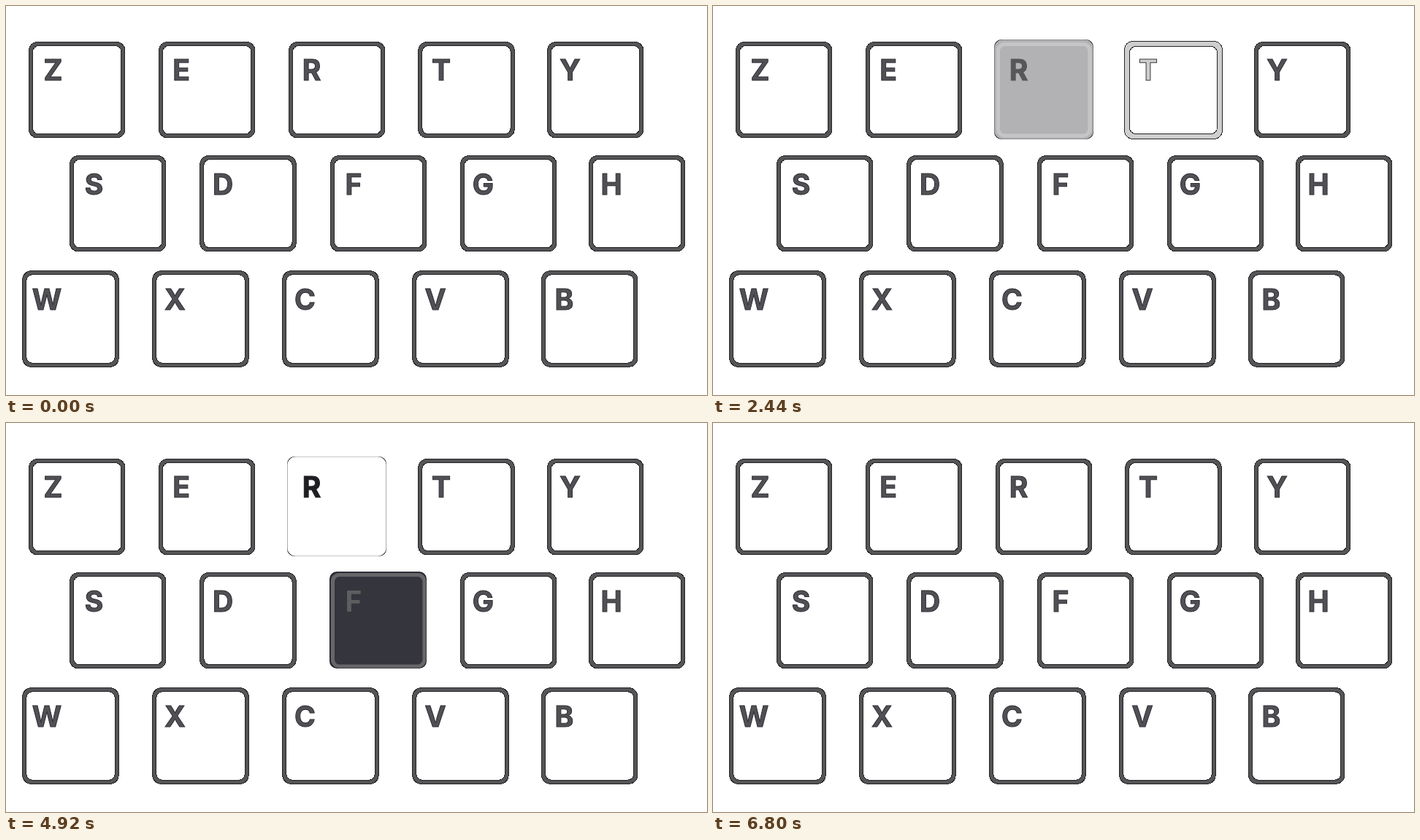
Write an HTML page that moves like this. It is 960 px wide and 534 px high and loops after 8 s.

```html
<!DOCTYPE html>
<html lang="en">
<head>
<meta charset="utf-8">
<title>Keyboard</title>
<style>
  html, body { margin: 0; width: 100%; height: 100%; overflow: hidden; background: #fff; }
  svg { display: block; width: 100%; height: 100%; }
  text { font: 700 39px Inter, "Open Sans", sans-serif; text-anchor: middle; }
  .frame { shape-rendering: crispEdges; }
</style>
</head>
<body>
<svg id="stage" viewBox="0 0 960 534"></svg>
<script>
const LOOP = 8000, STEP = 40, SIZE = 132.4;
const DARK = '#1e1e27', EDGE = '#252528', GREY = '#555557';
const stage = document.getElementById('stage');

const rows = [
  { y: 49, base: 101.6, keys: 'ZERTY', x: [31, 209, 387, 564.3, 741], mid: [64.5, 240, 418.5, 596, 772.5] },
  { y: 205, base: 258.6, keys: 'SDFGH', x: [87, 265.3, 444, 622, 798], mid: [120.5, 297, 476, 653.5, 829] },
  { y: 363.3, base: 416.8, keys: 'WXCVB', x: [22.3, 200.3, 378.3, 556.3, 733], mid: [56, 231.5, 409.5, 588, 764.5] }
];

// Outer box of each animated key and its presses: start, release, steps in, steps out.
const solidKeys = {
  R: { box: [385, 46, 136, 137], inset: .35, presses: [[1120, 2400, 7, 7], [3720, 6600, 7, 6]] },
  F: { box: [443, 204, 133, 133], inset: .7, presses: [[4920, 6600, 7, 6]] }
};
const outlineKeys = {
  T: { box: [563, 48, 135, 135], width: 8, presses: [[1880, 2400, 8, 7]] },
  D: { box: [265, 205, 133, 132], width: 7, presses: [[6080, 6600, 9, 6]] }
};

function add(parent, tag, attrs = {}, content = '') {
  const node = document.createElementNS('http://www.w3.org/2000/svg', tag);
  for (const name in attrs) node.setAttribute(name, attrs[name]);
  node.textContent = content;
  return parent.appendChild(node);
}

function box(parent, [x, y, width, height], inset, rx, attrs) {
  return add(parent, 'rect', {
    x: x + inset, y: y + inset, width: width - 2 * inset, height: height - 2 * inset,
    rx, fill: 'none', ...attrs
  });
}

// A grey band between two thin dark lines.
function frame(parent, bounds, width, color) {
  const layer = (inset, rx, fill) => box(parent, bounds, inset, rx, { class: 'frame', fill });
  layer(0, 12, EDGE);
  const band = layer(1, 11, color);
  layer(width - 1, 9, EDGE);
  layer(width, 8, '#fff');
  return band;
}

function letter(parent, key, fill, stroke = 'none') {
  return add(parent, 'text', { x: key.mid, y: key.base, fill, stroke, 'stroke-width': 1 }, key.name);
}

function buildSolid(key, { box: bounds, inset, presses }) {
  const group = add(stage, 'g');
  box(group, bounds, 0, 10, { fill: DARK });
  box(group, key.bounds, 3.5, 9, { stroke: GREY, 'stroke-width': 5 });
  letter(group, key, GREY);
  const cover = box(group, bounds, inset, 11.5, { fill: '#fff' });
  const glyph = letter(group, key, '#1f1f22', '#1f1f22');
  const paint = q => {
    cover.setAttribute('opacity', q);
    glyph.setAttribute('opacity', q);
  };
  return { group, presses, paint, level: solidLevel };
}

function buildOutline(key, { box: bounds, width, presses }) {
  const group = add(stage, 'g');
  const band = frame(group, bounds, width, GREY);
  const glyph = letter(group, key, GREY, '#39393e');
  const paint = q => {
    const v = Math.round(85 + 170 * q);
    const color = `rgb(${v},${v},${v})`;
    band.setAttribute('fill', color);
    glyph.setAttribute('fill', color);
  };
  return { group, presses, paint, level: outlineLevel };
}

function solidLevel(t, [start, release, stepsIn, stepsOut]) {
  if (t < release) {
    const k = Math.floor((t - start) / STEP);
    return Math.min(1, .1 + .9 * k / (stepsIn - 1));
  }
  const k = Math.floor((t - release) / STEP) + 1;
  return 1 - .9 * (k / (stepsOut - 1)) ** .88;
}

function outlineLevel(t, [start, release, stepsIn, stepsOut]) {
  if (t < release) {
    // The first step is held for two ticks.
    const k = Math.max(1, Math.floor((t - start) / STEP));
    return Math.min(1, k / stepsIn);
  }
  return 1 - (Math.floor((t - release) / STEP) + 1) / stepsOut;
}

const animated = [];
for (const row of rows) {
  [...row.keys].forEach((name, i) => {
    const key = { name, mid: row.mid[i], base: row.base, bounds: [row.x[i], row.y, SIZE, SIZE] };
    const normal = add(stage, 'g');
    frame(normal, key.bounds, 6, GREY);
    letter(normal, key, '#505055', '#2e2e34');
    const pressed = solidKeys[name] ? buildSolid(key, solidKeys[name])
      : outlineKeys[name] ? buildOutline(key, outlineKeys[name]) : null;
    if (pressed) animated.push({ normal, ...pressed });
  });
}

function render(t) {
  for (const { normal, group, presses, paint, level } of animated) {
    const press = presses.find(([start, release, , out]) => t >= start && t < release + (out - 1) * STEP);
    normal.style.display = press ? 'none' : '';
    group.style.display = press ? '' : 'none';
    if (press) paint(level(t, press));
  }
}

const began = performance.now();
function tick() {
  render((performance.now() - began) % LOOP);
  requestAnimationFrame(tick);
}
tick();
</script>
</body>
</html>
```
